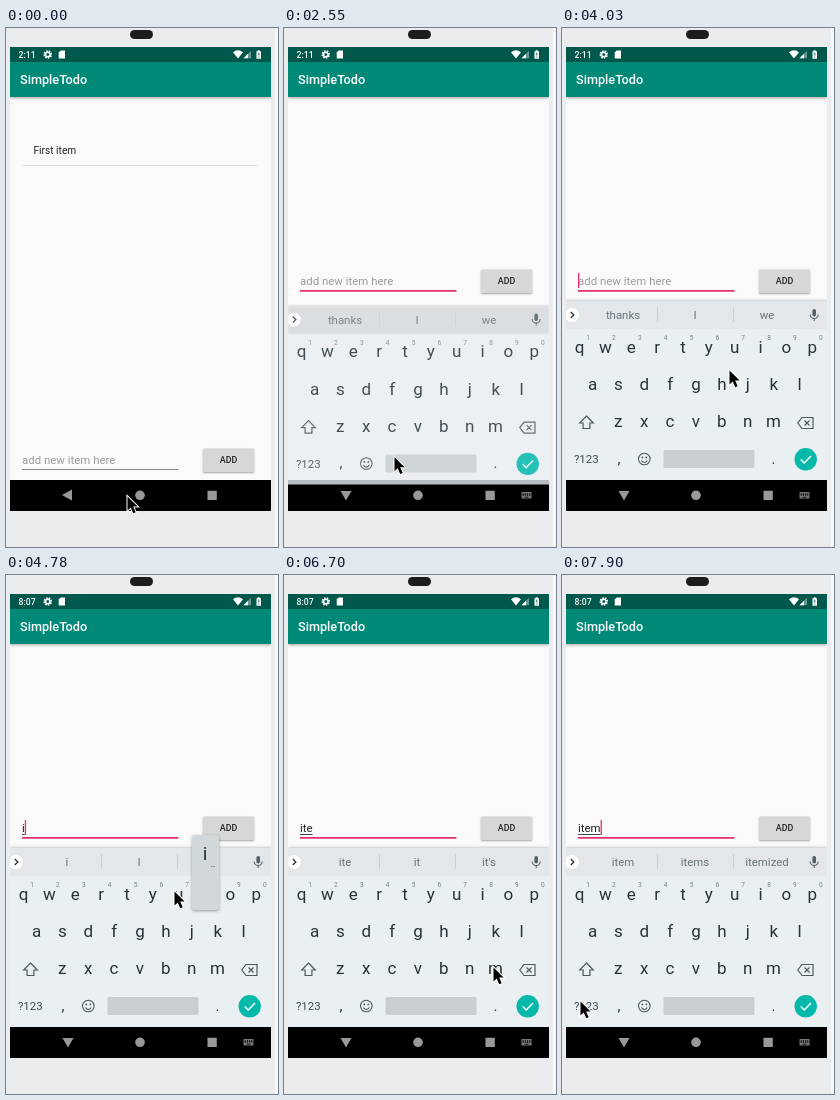
These frames come from a looping animation (272x519 px, 8000 ms). An HTML page with a canvas:

```html
<!DOCTYPE html>
<html lang="en">
<head>
<meta charset="utf-8">
<title>SimpleTodo</title>
<style>
  html, body { margin: 0; width: 100%; height: 100%; overflow: hidden; background: #ebecee; }
  canvas { display: block; }
</style>
</head>
<body>
<canvas id="stage" width="272" height="519"></canvas>
<script>
const ctx = document.getElementById('stage').getContext('2d');
const LOOP = 8000, STEP = 148.8;
const PINK = '#e52e72', INK = '#263339', BLINK = 3.36;

// Pointer tip: [step, x, y], linear between entries
const pointerPath = [
  [0, 121, 468], [1, 116, 449], [2, 106, 423], [10, 106, 423], [11, 110, 428], [19, 110, 429],
  [20, 113, 418], [21, 125, 385], [22, 137, 360], [23, 147, 350], [27, 167, 342], [28, 176, 335],
  [29, 190, 322], [30, 197, 318], [31, 196, 318], [32, 168, 316], [33, 137, 318], [34, 121, 319],
  [36, 121, 319], [37, 96, 319], [38, 72, 320], [40, 69, 320], [41, 112, 346], [42, 172, 380],
  [43, 223, 401], [44, 214, 396], [45, 209, 392], [47, 207, 392], [48, 160, 387], [49, 98, 390],
  [50, 47, 400], [51, 24, 434], [52, 18, 427], [53, 18, 426]
];
const presses = [
  { at: 31, key: 'i', x: 199, y: 260, more: true },
  { at: 36, key: 't', x: 121, y: 260, more: true },
  { at: 40, key: 'e', x: 69, y: 260, more: true },
  { at: 46, key: 'm', x: 211, y: 335 }
];
const suggestions = ['thanks I we', "i I it's", "it it's its", "ite it it's", 'item items itemized'];

function rect(x, y, w, h, color, r = 0) {
  ctx.fillStyle = color;
  ctx.beginPath();
  ctx.roundRect(x, y, w, h, r);
  ctx.fill();
}
function disc(x, y, r, color) {
  rect(x - r, y - r, 2 * r, 2 * r, color, r);
}
function fill(d, color) {
  ctx.fillStyle = color;
  ctx.fill(new Path2D(d));
}
function line(d, color, width = 1) {
  ctx.strokeStyle = color;
  ctx.lineWidth = width;
  ctx.stroke(new Path2D(d));
}
function text(s, x, y, size, color, align = 'left', weight = 400) {
  ctx.font = `${weight} ${size}px Roboto, sans-serif`;
  ctx.textAlign = align;
  ctx.fillStyle = color;
  ctx.fillText(s, x, y);
  return ctx.measureText(s).width;
}
function shadowed(blur, dy, draw) {
  ctx.save();
  ctx.shadowColor = 'rgba(0,0,0,.35)';
  ctx.shadowBlur = blur;
  ctx.shadowOffsetY = dy;
  draw();
  ctx.restore();
}

function drawPhone(n) {
  rect(0, 0, 272, 519, '#ebecee');
  rect(269, 0, 3, 519, '#f8f8f9');
  rect(124, 2, 23, 9, '#1b1c1e', 4.5);
  rect(4, 19, 261, 433, '#fafafa');
  shadowed(3, 1, () => rect(4, 34, 261, 35, '#008977'));
  rect(0, 34, 4, 38, '#ebecee');
  rect(265, 34, 4, 38, '#ebecee');
  rect(4, 19, 261, 15, '#00574b');
  text('SimpleTodo', 14, 56.3, 12.7, '#fff', 'left', 500);

  text(n < 28 ? '2:11' : '8:07', 12.5, 29.6, 8.7, '#fff', 'left', 500);
  ctx.setLineDash([1.6, 1.1]);
  line('M38.3 26.5a3.5 3.5 0 1 0 7 0a3.5 3.5 0 1 0 -7 0', '#fff', 1.6);
  ctx.setLineDash([]);
  line('M39.5 26.5a2.3 2.3 0 1 0 4.6 0a2.3 2.3 0 1 0 -4.6 0', '#fff', 1.6);
  fill('M54.7 22.5h4.3v8h-6.3v-6z', '#fff');
  fill('M227 24.2q5-4 10 0l-5 6.3z', '#fff');
  fill('M245 22.8v7.5h-7.5z', 'rgba(255,255,255,.4)');
  fill('M242 25.8v4.5h-4.5z', '#fff');
  fill('M250.5 23.2h1.2v-1h2v1h1.3v7.6h-4.5z', '#fff');
  line('M252.8 24.7v2.8M252.8 28.6v1', '#00574b', .9);
}

function drawForm(n, typed, typedAt) {
  const open = n >= 16, focused = n >= 12, dy = open ? -179 : 0;
  if (!open) {
    text('First item', 27.5, 125.7, 10.16, '#222');
    rect(17, 137, 234, 1, '#dedede');
  }
  shadowed(2, 1, () => rect(197, 420.5 + dy, 51, 23.5, '#d6d7d7', 1.3));
  text('ADD', 222.6, 435.3 + dy, 8.9, '#222', 'center', 500);

  let width = 0;
  if (typed) {
    width = text(typed, 16, 436.3 + dy, 11.43, '#222');
    rect(16, 438 + dy, width, .9, '#333');
  } else {
    text('add new item here', 16, 436.3 + dy, 11.43, '#9b9b9b');
  }
  rect(16, 441 + dy, 156.5, focused ? 1.7 : 1, focused ? PINK : '#8a8a8a');
  const sinceOn = typed ? n - typedAt : n - 20 + 4 * BLINK;
  if (n >= 14 && sinceOn % (2 * BLINK) < BLINK) rect(16 + width, 424 + dy, 1.3, 15, PINK);
}

function drawNav(open) {
  rect(4, 452, 261, 31, '#000');
  const gray = '#999';
  fill(open ? 'M56.5 463h11l-5.5 9.5z' : 'M66 461.5v11l-10 -5.5z', gray);
  disc(134, 467.3, 4.8, gray);
  rect(201.5, 462.7, 9.3, 9.3, gray, .5);
  if (open) {
    rect(237.5, 464, 10, 6.5, '#777', .5);
    for (let i = 0; i < 4; i++) rect(238.7 + i * 2.2, 465.2, 1, 2.6, '#000');
    rect(240.5, 468.8, 4, .8, '#000');
  }
}

function drawKeyRow(keys, x, y) {
  [...keys].forEach((key, i) => text(key, x + i * 25.87, y, 17, INK, 'center'));
}

function drawKeyboard(n, words) {
  const shift = n === 16 ? 22 : n === 17 ? 4.6 : 0;
  ctx.save();
  ctx.beginPath();
  ctx.rect(4, 260, 261, 192);
  ctx.clip();
  ctx.globalAlpha = n === 16 ? .35 : n === 17 ? .85 : 1;
  ctx.translate(0, shift);
  shadowed(3, 0, () => rect(4, 273, 261, 28, '#e3e7ea'));
  rect(4, 301, 261, 151, '#eaeff2');

  disc(10, 287, 7, '#fff');
  line('M8.8 284l3 3l-3 3', INK, 1.3);
  words.forEach((word, i) => text(word, 61 + i * 72, 291.2, 11.43, '#69747a', 'center'));
  rect(95, 279, 1, 15, '#cbd1d4');
  rect(171, 279, 1, 15, '#cbd1d4');
  rect(250.4, 281, 3.6, 7.5, '#546067', 1.8);
  line('M248.2 286.5a4 4 0 0 0 8 0M252.2 290.5v2.5', '#546067', 1.1);

  drawKeyRow('qwertyuiop', 17.5, 324.7);
  [...'1234567890'].forEach((digit, i) => text(digit, 26 + i * 25.87, 312.3, 6.6, '#78848a', 'center'));
  drawKeyRow('asdfghjkl', 30.6, 362);
  drawKeyRow('zxcvbnm', 56.3, 399.2);
  line('M24.5 388l6.8 7h-3.4v5.5h-6.8v-5.5h-3.4z', '#4c595f', 1.2);
  line('M240 389.5h11v11h-11l-4.2-5.5zM242.5 392.5l5 5M247.5 392.5l-5 5', '#4c595f', 1.2);

  text('?123', 24.3, 435.2, 11.43, '#3e4a50', 'center');
  text(',', 57, 435.5, 15, INK, 'center');
  text('.', 211.5, 435.5, 15, INK, 'center');
  line('M76.5 431a5.8 5.8 0 1 0 11.6 0a5.8 5.8 0 1 0 -11.6 0M79.3 432.5q3 4 6 0', '#4c595f', 1.1);
  disc(80.3, 429.4, .9, '#4c595f');
  disc(84.3, 429.4, .9, '#4c595f');
  rect(101.5, 422, 91, 18, '#c9ced1', 1.5);
  disc(243.7, 431.3, 11.2, '#04b9aa');
  line('M238.7 431.5l3.5 3.5l6.8 -7', '#fff', 1.5);
  ctx.restore();
  if (n === 17) rect(4, 452, 261, 4.6, '#b9bdbf');
}

function drawPopup({ key, x, y, more }) {
  shadowed(3, 1, () => rect(x - 13, y, 27, 75, '#d2d7da', 2));
  text(key, x, y + 24.5, 19, INK, 'center');
  if (more) text('…', x + 8, y + 31.5, 7.5, INK, 'center');
}

function drawPointer(n) {
  const next = pointerPath.findIndex(p => p[0] >= n);
  const b = pointerPath[next < 0 ? pointerPath.length - 1 : next];
  const a = pointerPath[Math.max(0, next - 1)];
  const k = b[0] > a[0] ? (n - a[0]) / (b[0] - a[0]) : 1;
  ctx.save();
  ctx.translate(a[1] + (b[1] - a[1]) * k, a[2] + (b[2] - a[2]) * k);
  const arrow = 'M.5 .5v14l3.2-3l2.5 5.8l2.5-1.1l-2.5-5.6h4.4z';
  line(arrow, '#fff', 2);
  fill(arrow, '#000');
  ctx.restore();
}

function draw(now) {
  const n = Math.floor(now % LOOP / STEP);
  const done = presses.filter(p => p.at <= n);
  const last = done[done.length - 1];
  const open = n >= 16;
  drawPhone(n);
  drawForm(n, done.map(p => p.key).join(''), last ? last.at : 0);
  drawNav(open);
  if (open) drawKeyboard(n, suggestions[done.length].split(' '));
  if (last && n - last.at < 2) drawPopup(last);
  drawPointer(n);
}

const start = performance.now();
(function tick() {
  draw(performance.now() - start);
  requestAnimationFrame(tick);
})();
</script>
</body>
</html>
```
